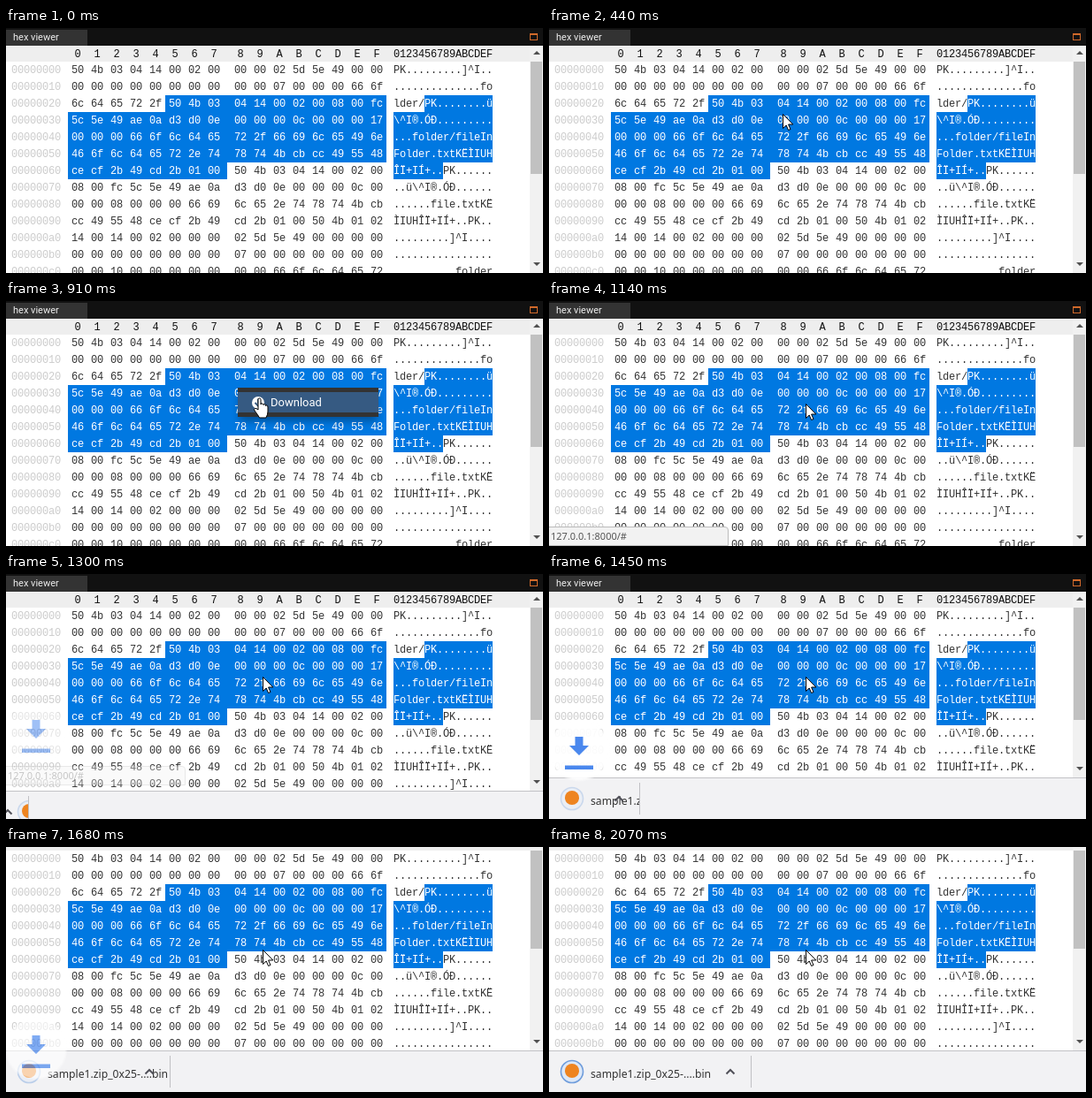
These frames come from a looping animation (607x277 px, 2.15 s). An HTML page:

```html
<!DOCTYPE html>
<html lang="en">
<head>
<meta charset="utf-8">
<title>Hex viewer</title>
<style>
html, body { margin: 0; width: 100%; height: 100%; overflow: hidden; background: #fff; }
#stage { position: relative; width: 607px; height: 277px; overflow: hidden; background: #fff; }
#stage div, #stage span.at, #stage svg { position: absolute; white-space: pre; }
#page, #rows, #overlay { left: 0; top: 0; }
#bar { left: 0; top: 0; width: 607px; height: 20px; background: #111; }
#tab { left: 0; top: 2px; width: 92px; height: 18px; background: #333; color: #eee;
  font: 11px/18px Roboto, "Liberation Sans", sans-serif; text-indent: 8px; }
#max { left: 592px; top: 6px; width: 7px; height: 5px; border: 1px solid #d0692a; border-top-width: 2px; }
.row { left: 0; width: 592px; height: 19px; color: #333;
  font: 12px/21px "Liberation Mono", "Courier New", monospace; letter-spacing: -.2px; }
.head { top: 20px; height: 18px; background: #eee; color: #111; }
.off { left: 6px; color: #ccc; }
.sel { background: #0078e1; color: #fff; height: 19px; }
#track { left: 592px; width: 15px; background: #f1f1f1; }
#thumb { left: 593px; width: 13px; background: #c1c1c1; }
.tri { left: 596px; border: 4px solid transparent; border-top-width: 0; border-bottom-color: #505050; }
#down { transform: rotate(180deg); }
#shelf { left: 0; width: 607px; height: 46px; background: #f2f2f4; border-top: 1px solid #c2c2c6; }
#item { left: 0; top: 0; height: 46px; overflow: hidden; }
#name { left: 47px; top: 16px; color: #333; font: 12.2px/20px "Noto Sans", "Open Sans", sans-serif; }
#sep { right: 0; top: 5px; width: 1px; height: 36px; background: #c0c0c4; }
#chev { right: 18px; top: 19px; }
#icon { left: 12px; top: 9px; }
#menu { left: 262px; top: 98px; width: 159px; height: 33px; background: #333;
  box-shadow: 0 6px 10px -2px rgba(0,0,0,.35); }
#opt { left: 0; top: 5px; width: 159px; height: 23px; color: #fff; text-indent: 37px;
  font: 13px/24px Roboto, "Liberation Sans", sans-serif; }
#opt.hot { background: #365a82; }
#opt svg { left: 15px; top: 4px; }
#status { left: -1px; width: 202px; height: 20px; background: #f2f2f2; border: 1px solid #bbb;
  border-radius: 0 4px 0 0; color: #555; font: 11px/20px "Noto Sans", "Open Sans", sans-serif; text-indent: 2px; }
</style>
</head>
<body>
<div id="stage">
  <div id="page">
    <div id="bar"><div id="tab">hex viewer</div><div id="max"></div></div>
    <div id="rows"></div>
  </div>
  <div id="track"></div>
  <div id="thumb"></div>
  <div id="up" class="tri"></div>
  <div id="down" class="tri"></div>
  <div id="shelf">
    <div id="item">
      <svg id="icon" width="28" height="28">
        <circle id="ring" cx="14" cy="14" r="12.5" fill="#dde8f7" stroke="#6f9ddc" stroke-width="1.6"/>
        <circle cx="14" cy="13" r="8" fill="#ee8420"/>
      </svg>
      <div id="name">sample1.zip_0x25-....bin</div>
      <svg id="chev" width="12" height="8"><path d="M1.5 6.5L6 2L10.5 6.5" fill="none" stroke="#505058" stroke-width="2"/></svg>
      <div id="sep"></div>
    </div>
  </div>
  <div id="menu">
    <div id="opt"><svg width="16" height="16"><circle cx="8" cy="8" r="7" fill="#fff"/><path d="M8 3.5V9M4.5 8L8 11.5L11.5 8" fill="none" stroke="#365a82" stroke-width="2"/></svg>Download</div>
  </div>
  <div id="status">127.0.0.1:8000/#</div>
  <svg id="overlay" width="607" height="277">
    <defs>
      <radialGradient id="glow">
        <stop offset=".9" stop-color="#fff" stop-opacity=".95"/>
        <stop offset="1" stop-color="#fff" stop-opacity="0"/>
      </radialGradient>
    </defs>
    <g id="drop">
      <circle cx="34" cy="-20" r="36" fill="url(#glow)"/>
      <path d="M29.5 -35H38.5V-25H45L34 -14L23 -25H29.5ZM18 -2.5H50V2H18Z" fill="#4484ee"/>
    </g>
    <g id="cursor" stroke="#000" fill="#fff" stroke-linejoin="round">
      <path id="arrow" d="M.5 .5V16.5L4.2 13L6.6 18.5L9 17.5L6.6 12H11.8Z"/>
      <path id="hand" transform="translate(-7 -1)" d="M5 14V2.5Q5 1 6.5 1T8 2.5V8Q8 7 9.5 7T11 8.5Q11 7.7 12.3 7.7T13.5 9.5Q13.5 9 14.7 9T16 11V16Q16 19 14 23H6.5Q5 20 1 15Q0 13 1.5 12.5T5 14Z"/>
    </g>
  </svg>
</div>
<script>
const LOOP = 2150;
const TICKS = [0, 70, 150, 220, 300, 370, 440, 610, 830, 910, 990, 1070, 1150, 1220, 1300,
  1370, 1450, 1530, 1600, 1680, 1760, 1830, 1920, 2000, 2070];
const SEL_FROM = 0x25, SEL_TO = 0x68;
const DUMP = `50 4b 03 04 14 00 02 00 00 00 02 5d 5e 49 00 00
00 00 00 00 00 00 00 00 00 00 07 00 00 00 66 6f
6c 64 65 72 2f 50 4b 03 04 14 00 02 00 08 00 fc
5c 5e 49 ae 0a d3 d0 0e 00 00 00 0c 00 00 00 17
00 00 00 66 6f 6c 64 65 72 2f 66 69 6c 65 49 6e
46 6f 6c 64 65 72 2e 74 78 74 4b cb cc 49 55 48
ce cf 2b 49 cd 2b 01 00 50 4b 03 04 14 00 02 00
08 00 fc 5c 5e 49 ae 0a d3 d0 0e 00 00 00 0c 00
00 00 08 00 00 00 66 69 6c 65 2e 74 78 74 4b cb
cc 49 55 48 ce cf 2b 49 cd 2b 01 00 50 4b 01 02
14 00 14 00 02 00 00 00 02 5d 5e 49 00 00 00 00
00 00 00 00 00 00 00 00 07 00 00 00 00 00 00 00
00 00 10 00 00 00 00 00 00 00 66 6f 6c 64 65 72`;

const $ = id => document.getElementById(id);

function add(parent, tag, cls, text = "") {
  const el = parent.appendChild(document.createElement(tag));
  el.className = cls;
  el.textContent = text;
  return el;
}

// Cells are 22px wide; the two beside the middle gap get 4px more.
function addCell(row, i, text, selected) {
  const wide = i === 7 || i === 8;
  const cell = add(row, "span", selected ? "at sel" : "at", text);
  cell.style.left = 70 + 22 * i + (i > 8 ? 8 : i > 7 ? 4 : 0) + "px";
  cell.style.width = (wide ? 26 : 22) + "px";
  cell.style.textIndent = (text.length < 2 ? 7.5 : 4) + (i === 8 ? 4 : 0) + "px";
}

function addAscii(row, from, text, selected) {
  if (!text) return;
  const el = add(row, "span", selected ? "at sel" : "at", text);
  el.style.left = 438 + 7 * from + "px";
  el.style.width = 7 * text.length + "px";
}

const printable = hex => {
  const n = parseInt(hex, 16);
  return (n > 31 && n < 127) || n > 159 ? String.fromCharCode(n) : ".";
};

const head = add($("rows"), "div", "row head");
const digits = "0123456789ABCDEF";
[...digits].forEach((d, i) => addCell(head, i, d));
addAscii(head, 0, digits);

DUMP.split("\n").forEach((line, r) => {
  const row = add($("rows"), "div", "row"), bytes = line.split(" "), base = r * 16;
  row.style.top = 38 + 19 * r + "px";
  add(row, "span", "at off", base.toString(16).padStart(8, "0"));
  bytes.forEach((b, i) => addCell(row, i, b, base + i >= SEL_FROM && base + i < SEL_TO));
  const text = bytes.map(printable).join("");
  const clip = n => Math.max(0, Math.min(16, n - base));
  const a = clip(SEL_FROM), b = clip(SEL_TO);
  addAscii(row, 0, text.slice(0, a));
  addAscii(row, a, text.slice(a, b), true);
  addAscii(row, b, text.slice(b));
});

const progress = (t, start, span) => Math.max(0, Math.min(1, (t - start) / span));
const easeOut = v => 1 - (1 - v) ** 2;
const mix = (a, b, v) => a + (b - a) * v;
const show = (el, on) => { el.style.visibility = on ? "visible" : "hidden"; };
const move = (el, x, y) => el.setAttribute("transform", `translate(${x} ${y})`);

function place(id, top, height) {
  const style = $(id).style;
  style.top = top + "px";
  if (height !== undefined) style.height = height + "px";
}

function pointer(t) {
  if (t < 610) {
    const v = easeOut(progress(t, 70, 370));
    return [mix(428, 264, v), mix(235, 97, v)];
  }
  const v = progress(t, 750, 240);
  return [mix(264, 290, easeOut(v)), mix(97, 116, v)];
}

function render(t) {
  const scroll = t >= 1680 ? 34 : 0;
  const bottom = Math.round(277 - 47 * easeOut(progress(t, 1235, 150)));
  place("page", -scroll);
  place("track", 20 - scroll, bottom - 20 + scroll);
  place("thumb", 38 - scroll, scroll ? 111 : 127);
  place("up", 26 - scroll);
  place("down", bottom - 12);

  place("shelf", bottom);
  $("item").style.width = Math.round(229 * easeOut(progress(t, 1256, 750))) + "px";
  $("ring").style.opacity = mix(.3, 1, progress(t, 1600, 470));

  const open = t >= 610 && t < 1070, hot = t >= 830 && open;
  show($("menu"), open);
  $("opt").className = hot ? "hot" : "";

  place("status", 255 - 47 * easeOut(progress(t, 1215, 150)));
  $("status").style.opacity = progress(t, 930, 120) * (1 - progress(t, 1200, 150));

  const fall = progress(t, 1210, 600);
  $("drop").style.opacity = 1 - 4 * (fall - .5) ** 2;
  move($("drop"), 0, Math.round(189 + 75 * fall));

  const [x, y] = pointer(t);
  move($("cursor"), Math.round(x), Math.round(y));
  show($("arrow"), t >= 70 && !hot);
  show($("hand"), hot);
}

const start = performance.now();
function loop() {
  const t = (performance.now() - start) % LOOP;
  render(TICKS.findLast(k => k <= t) ?? 0);
  requestAnimationFrame(loop);
}
loop();
</script>
</body>
</html>
```
